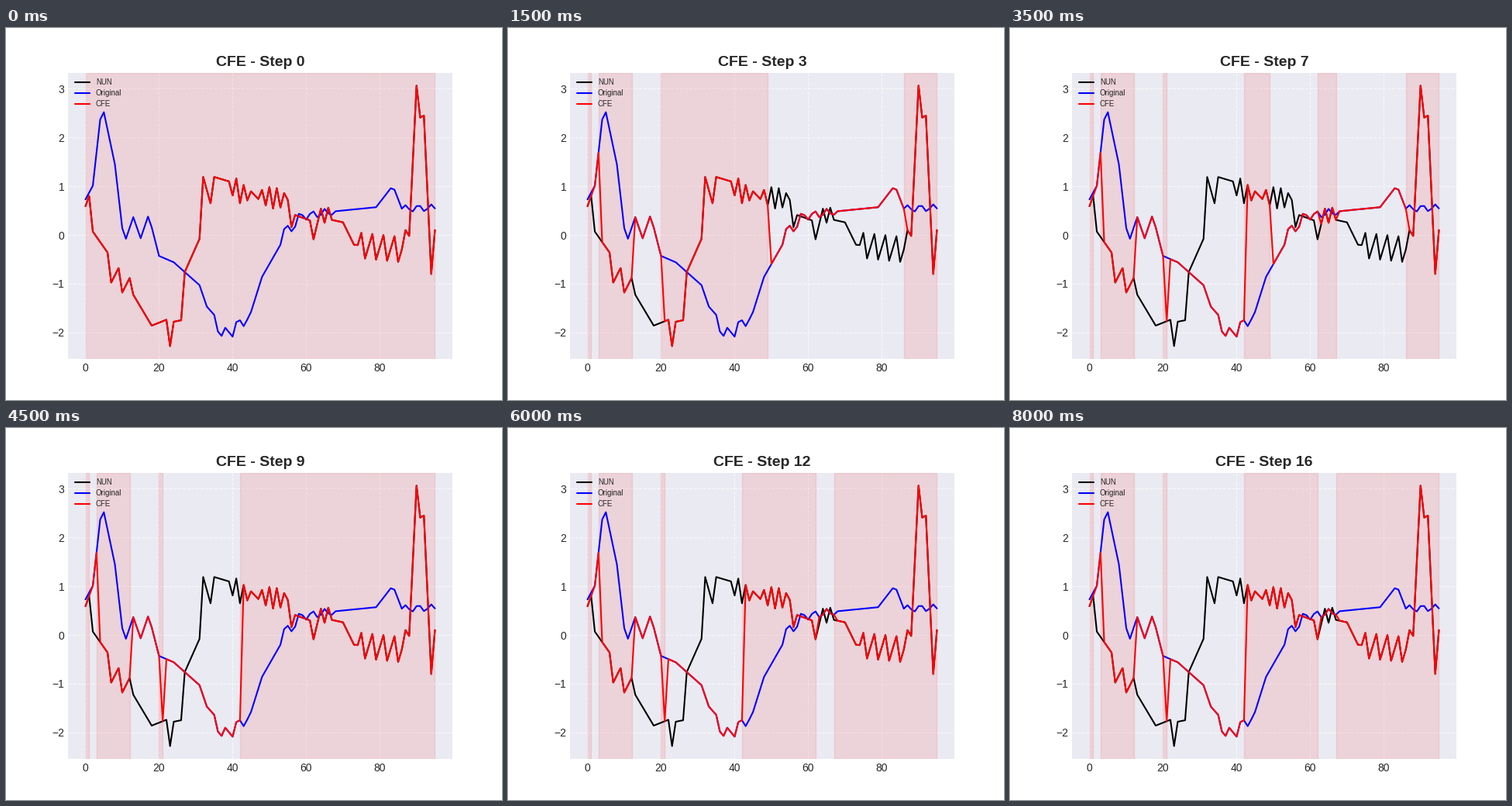
Animation, 640 px wide and 480 px high, one loop 8500 ms. Source, as a matplotlib script:

```python
import matplotlib.pyplot as plt
import numpy as np
from matplotlib.animation import FuncAnimation

STEPS = 17
INK = "0.15"
t = np.arange(96)

plt.rcParams.update({
    "font.family": "sans-serif",
    "font.sans-serif": ["Liberation Sans"],
    "text.color": INK,
    "xtick.color": INK,
    "ytick.color": INK,
    "xtick.major.size": 0,
    "ytick.major.size": 0,
    "axes.facecolor": "#EAEAF2",
    "axes.linewidth": 0,
    "axes.axisbelow": True,
    "grid.color": "white",
    "lines.solid_capstyle": "round",
})


def trend(*turns):
    """Straight runs between the main turning points."""
    return np.interp(t, *zip(*turns))


def ripple(start, end, peak, period, size):
    """A cosine wiggle limited to start..end, with a crest at peak."""
    wave = size * np.cos(2 * np.pi * (t - peak) / period)
    return np.where((t >= start) & (t <= end), wave, 0)


original = trend(
    (0, 0.73), (2, 1.01), (4, 2.37), (5, 2.52), (8, 1.45), (10, 0.14),
    (18, 0.16), (20, -0.43), (24, -0.56), (31, -1.03), (33, -1.47),
    (35, -1.64), (36, -1.98), (40, -2.0), (42, -1.75), (44, -1.82),
    (48, -0.86), (53, -0.2), (54, 0.12), (56, 0.1), (58, 0.37), (67, 0.48),
    (79, 0.57), (83, 0.96), (84, 0.93), (86, 0.54), (95, 0.56),
)
original += ripple(10, 18, peak=13, period=4, size=0.22)
original += ripple(36, 44, peak=38.25, period=3, size=0.1)
original += ripple(55, 67, peak=55, period=10 / 3, size=0.08)
original += ripple(87, 95, peak=87, period=3.5, size=0.07)

nun = trend(
    (0, 0.59), (1, 0.8), (2, 0.07), (6, -0.36), (7, -0.76), (12, -1.1),
    (18, -1.86), (22, -1.74), (23, -2.28), (24, -1.78), (26, -1.75),
    (27, -0.76), (31, -0.08), (32, 1.19), (34, 0.65), (35, 1.19),
    (39, 1.1), (42, 0.86), (55, 0.72), (56, 0.16), (57, 0.41), (61, 0.3),
    (62, -0.09), (64, 0.54), (65, 0.25), (66, 0.56), (67, 0.31),
    (70, 0.26), (73, -0.2), (86, -0.3), (87, 0.1), (88, -0.02),
    (90, 3.065), (91, 2.41), (92, 2.45), (94, -0.8), (95, 0.1),
)
nun += ripple(7, 12, peak=8.75, period=3, size=0.25)
nun += ripple(40, 54, peak=41, period=20 / 9, size=0.22)
nun += ripple(75, 85, peak=74.75, period=3, size=0.3)

HEAD = [(0, 1), (3, 12)]
SPLIT = HEAD + [(20, 21)]
TAIL = [(86, 95)]

# Replaced segments, keyed by the step at which they take effect
SEGMENTS = {
    0: [(0, 95)],
    1: [(0, 49)] + TAIL,
    2: [(0, 12), (20, 49)] + TAIL,
    3: HEAD + [(20, 49)] + TAIL,
    4: SPLIT + [(42, 49)] + TAIL,
    6: SPLIT + [(42, 49), (62, 67)] + TAIL,
    8: SPLIT + [(42, 67)] + TAIL,
    9: SPLIT + [(42, 95)],
    10: SPLIT + [(42, 62), (67, 95)],
}


def segments_at(step):
    return SEGMENTS[max(k for k in SEGMENTS if k <= step)]


def blend(segments):
    """Take the neighbour's values inside the segments, the query's elsewhere."""
    mask = t == 0
    for start, end in segments:
        mask |= (t > start) & (t <= end)
    return np.where(mask, nun, original)


fig, ax = plt.subplots(figsize=(6.4, 4.8), dpi=100)
ax.plot(t, nun, color="black", label="NUN")
ax.plot(t, original, color="blue", label="Original")
cfe_line, = ax.plot(t, nun, color="red", label="CFE")
ax.set_xlim(-4.75, 99.75)
ax.set_ylim(-2.547, 3.332)
ax.grid(True, linestyle="--", alpha=0.7)
ax.legend(loc="upper left", bbox_to_anchor=(0, 1.0027), fontsize=7,
          labelspacing=0.4, frameon=False)
title = ax.set_title("", fontsize=14, fontweight="bold")
spans = []


def update(step):
    while spans:
        spans.pop().remove()
    segments = segments_at(step)
    for start, end in segments:
        spans.append(ax.axvspan(start, end, color="red", alpha=0.1))
    cfe_line.set_ydata(blend(segments))
    title.set_text(f"CFE - Step {step}")
    return [cfe_line, title, *spans]


anim = FuncAnimation(fig, update, frames=STEPS, init_func=lambda: update(0),
                     interval=500, repeat=True, repeat_delay=0, blit=False)
plt.show()
```
